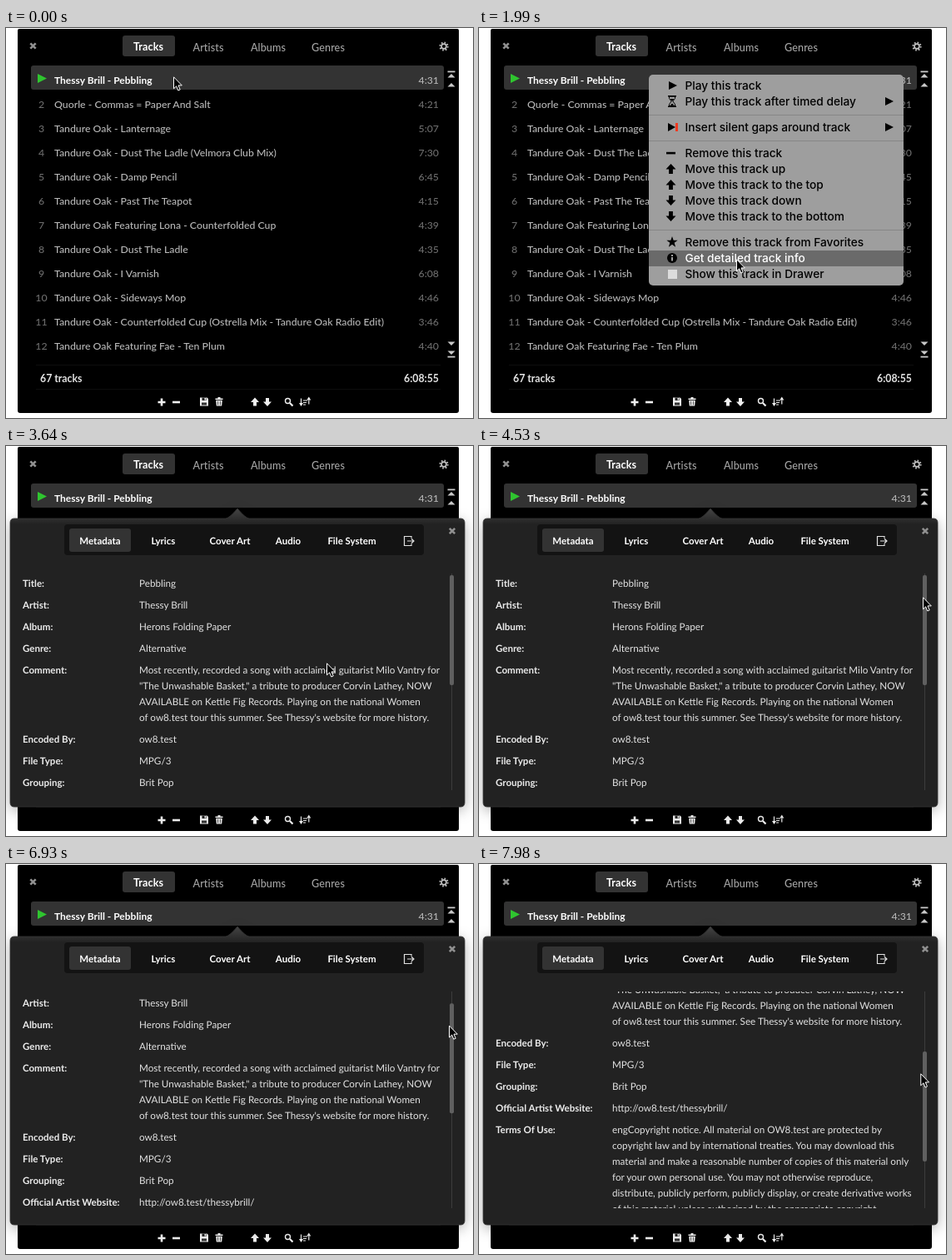
An HTML page for the animation above (8000 ms loop, 561 by 468 pixels).

```html
<!DOCTYPE html>
<html lang="en">
<head>
<meta charset="utf-8">
<title>Track list</title>
<style>
  html, body { margin: 0; width: 100%; height: 100%; overflow: hidden; background: #fff; }
  svg { display: block; width: 100%; height: 100%; user-select: none; }
  text { font: 500 12.3px Lato, "Open Sans", sans-serif; white-space: pre; }
  .b { font-weight: 700; }
  .row { fill: #b8b8b8; }
  .row.b { font-size: 12px; }
  .num { fill: #6c6c6c; }
  .tab { font-size: 12.6px; fill: #a4a4a4; letter-spacing: .1px; }
  .info { font-size: 11.7px; font-weight: 400; fill: #e2e2e2; }
  .label { font-size: 11.5px; font-weight: 700; fill: #ececec; }
  .item { font: 500 13.7px Inter, "Liberation Sans", sans-serif; fill: #000; }
  #panel text { text-rendering: geometricPrecision; }
  #shell { filter: drop-shadow(0 4px 8px rgba(0, 0, 0, .3)); }
</style>
</head>
<body>
<svg id="stage" viewBox="0 0 561 468"></svg>
<script>
const LOOP = 8000;

const tracks = [
  ["Thessy Brill - Pebbling", "4:31"],
  ["Quorle - Commas = Paper And Salt", "4:21"],
  ["Tandure Oak - Lanternage", "5:07"],
  ["Tandure Oak - Dust The Ladle (Velmora Club Mix)", "7:30"],
  ["Tandure Oak - Damp Pencil", "6:45"],
  ["Tandure Oak - Past The Teapot", "4:15"],
  ["Tandure Oak Featuring Lona - Counterfolded Cup", "4:39"],
  ["Tandure Oak - Dust The Ladle", "4:35"],
  ["Tandure Oak - I Varnish", "6:08"],
  ["Tandure Oak - Sideways Mop", "4:46"],
  ["Tandure Oak - Counterfolded Cup (Ostrella Mix - Tandure Oak Radio Edit)", "3:46"],
  ["Tandure Oak Featuring Fae - Ten Plum", "4:40"]
];

const details = [
  ["Title:", "Pebbling"],
  ["Artist:", "Thessy Brill"],
  ["Album:", "Herons Folding Paper"],
  ["Genre:", "Alternative"],
  ["Comment:",
    "Most recently, recorded a song with acclaimed guitarist Milo Vantry for",
    "\"The Unwashable Basket,\" a tribute to producer Corvin Lathey, NOW",
    "AVAILABLE on Kettle Fig Records. Playing on the national Women",
    "of ow8.test tour this summer. See Thessy's website for more history."],
  ["Encoded By:", "ow8.test"],
  ["File Type:", "MPG/3"],
  ["Grouping:", "Brit Pop"],
  ["Official Artist Website:", "http://ow8.test/thessybrill/"],
  ["Terms Of Use:",
    "engCopyright notice. All material on OW8.test are protected by",
    "copyright law and by international treaties. You may download this",
    "material and make a reasonable number of copies of this material only",
    "for your own personal use. You may not otherwise reproduce,",
    "distribute, publicly perform, publicly display, or create derivative works",
    "of this material unless authorized by the appropriate copyright"]
];

// Menu entries: centre line, label, icon
const menu = [
  [69, "Play this track", "play"],
  [88, "Play this track after timed delay", "glass"],
  [119, "Insert silent gaps around track", "gap"],
  [150, "Remove this track", "minus"],
  [169, "Move this track up", "up"],
  [188, "Move this track to the top", "up"],
  [207, "Move this track down", "down"],
  [226, "Move this track to the bottom", "down"],
  [257, "Remove this track from Favorites", "star"],
  [276, "Get detailed track info", "info"],
  [295, "Show this track in Drawer", "box"]
];

const path = (d, fill, extra = "") => `<path d="${d}" fill="${fill}" ${extra}/>`;
const line = (d, color, w = 1) => path(d, "none", `stroke="${color}" stroke-width="${w}"`);
const rect = (x, y, w, h, fill, r = 0, extra = "") =>
  `<rect x="${x}" y="${y}" width="${w}" height="${h}" rx="${r}" fill="${fill}" ${extra}/>`;
const text = (x, y, str, cls, anchor = "start", fill = "") =>
  `<text x="${x}" y="${y}" class="${cls}" text-anchor="${anchor}"${fill && ` style="fill:${fill}"`}>${str}</text>`;
const at = (x, y, body, scale = 1) => `<g transform="translate(${x} ${y}) scale(${scale})">${body}</g>`;

const ARROW = "M0-5L5 .5H2V5H-2V.5H-5Z";
const flip = body => `<g transform="scale(1 -1)">${body}</g>`;
const starPath = "M" + Array.from({ length: 10 }, (_, i) => {
  const r = i % 2 ? 2.8 : 7, a = i * Math.PI / 5;
  return `${(r * Math.sin(a)).toFixed(2)} ${(-r * Math.cos(a)).toFixed(2)}`;
}).join("L") + "Z";
const bigArrow = at(-1.5, 0, path(ARROW, "#000"), 1.2);

const icons = {
  play: path("M-4-5L6 0L-4 5Z", "#000"),
  glass: line("M-5-6.2H5M-5 6.2H5", "#000", 1.6) +
    path("M-3.5-6V-3.5L-.8 0L-3.5 3.5V6H3.5V3.5L.8 0L3.5-3.5V-6Z", "none", 'stroke="#000"') +
    path("M-2.5-3L0 0L2.5-3ZM-3 5.5L0 2.5L3 5.5Z", "#000"),
  gap: path("M-5-5L4 0L-5 5Z", "#000") + rect(4, -5, 3, 10, "#f03a20"),
  minus: rect(-7, -1.2, 11, 2.6, "#000"),
  up: bigArrow,
  down: flip(bigArrow),
  star: path(starPath, "#000"),
  info: '<circle r="6"/>' + rect(-1, -1, 2, 4.5, "#a0a0a0") + rect(-1, -4, 2, 2, "#a0a0a0"),
  box: rect(-5, -5, 11, 11, "#dcdcdc")
};

const cross = (x, y) => at(x, y, line("M-3.2-3.2L3.2 3.2M3.2-3.2L-3.2 3.2", "#909090", 2.6));

function windowArt() {
  const ends = path("M-4.5 0L0-4.5L4.5 0Z", "#c8c8c8");
  const jump = rect(-4.5, -9.5, 9, 1.8, "#c8c8c8") + at(0, -1.5, ends) + at(0, 9.5, ends);
  return path("M14 3Q14 1 16 1H542Q544 1 544 3V459Q544 462 541 462H17Q14 462 14 459Z", "#000") +
    cross(32.5, 21.5) +
    rect(140, 9, 63, 25, "#333", 3) +
    text(171, 26.5, "Tracks", "tab b", "middle", "#fff") +
    ["Artists", "Albums", "Genres"].map((s, i) => text(243 + 72 * i, 27.5, s, "tab", "middle")).join("") +
    at(526, 22, `<g fill="none" stroke="#c4c4c4"><circle r="4.6" stroke-width="2" stroke-dasharray="1.6 2.01"/>
      <circle r="2.9" stroke-width="1.6"/></g>`) +
    rect(30, 45, 496, 29, "#333", 3) +
    path("M38 55L49 60.5L38 66Z", "#2fc52f") +
    tracks.map(([name, time], i) => {
      const y = 66.5 + 29 * i, on = i === 0;
      return (on ? "" : text(42.5, y, i + 1, "num", "middle")) +
        text(58, y, name, on ? "row b" : "row", "start", on ? "#fff" : "") +
        text(520, y, time, "num", "end", on ? "#b4b4b4" : "");
    }).join("") +
    at(535, 61, jump) + at(535, 386, flip(jump)) +
    line("M36 404.5H522M36 433.5H522", "#0e0e0e") +
    text(41, 424.5, "67 tracks", "b", "start", "#e4e4e4") +
    text(520, 424.5, "6:08:55", "b", "end", "#e4e4e4") +
    toolbar();
}

function toolbar() {
  const c = "#f0f0f0";
  return at(187, 449, line("M-4.5 0H4.5M0-4.5V4.5", c, 2.6)) +
    at(204.5, 449, line("M-4.5 0H4.5", c, 2.6)) +
    at(238, 448.5, path("M-5-5H3.5L5-3.5V5H-5Z", c) + rect(-2.5, -5, 5, 3.5, "#222") +
      rect(.5, -4.5, 1.5, 2.5, c) + rect(-3, 1, 6, 3, "#333")) +
    at(256, 448.5, path("M-4.5-4H-1.5V-5.5H1.5V-4H4.5V-2.5H-4.5ZM-3.8-1.8H3.8L3.2 5H-3.2Z", c) +
      line("M-1.4-.8V4M1.4-.8V4", "#222", .8)) +
    at(299, 448.5, path(ARROW, c)) +
    at(314, 449, flip(path(ARROW, c))) +
    at(339, 448, `<circle r="3" cx="-.5" cy="-.5" fill="none" stroke="${c}" stroke-width="1.4"/>` +
      line("M2 2L5.5 5.5", c, 2.2)) +
    at(359, 448.5, line("M-4.5-4V3.5M-2-1.5H3M-2 1H2M-2 3.5H1M4.8-2V3", c, 1.2) +
      path("M-7 1.5H-2L-4.5 5.5ZM2.3-2H7.3L4.8-6Z", c));
}

function menuArt() {
  return rect(204, 56, 306, 253, "#9e9e9e", 5) +
    line("M204 104.5H510M204 135.5H510M204 242.5H510", "#868686") +
    rect(204, 0, 306, 19, "#6a6a6a", 0, 'id="hover"') +
    menu.map(([y, label, icon]) => at(232, y, icons[icon]) +
      text(247.5, y + 5, label, "item")).join("") +
    [88, 119].map(y => path(`M488 ${y - 5}L498 ${y}L488 ${y + 5}Z`, "#000")).join("");
}

function panelArt() {
  const tabs = [[113, "Metadata"], [189, "Lyrics"], [269, "Cover Art"], [339, "Audio"], [415.5, "File System"]];
  let y = 169;
  const list = details.map(([label, ...lines]) => {
    const out = text(20, y, label, "label") +
      lines.map((s, i) => text(160, y + 19 * i, s, "info")).join("");
    y += 26 + 19 * (lines.length - 1);
    return out;
  }).join("");
  return `<defs>
      <linearGradient id="skin" gradientUnits="userSpaceOnUse" x1="0" y1="75" x2="0" y2="94">
        <stop stop-color="#444"/><stop offset="1" stop-color="#222"/></linearGradient>
      <clipPath id="view"><rect x="15" y="153" width="515" height="260"/></clipPath>
    </defs>` +
    path("M10 87H264Q269 86 278 75Q287 86 292 87H546Q551 87 551 92V428Q551 433 546 433H10Q5 433 5 428V92Q5 87 10 87Z",
      "url(#skin)", 'id="shell" stroke="#343434" stroke-width=".8"') +
    rect(70, 94, 432, 37, "#131313", 4) +
    rect(76, 99, 74, 28, "#333", 3) +
    tabs.map(([x, s]) => text(x, 118, s, "label", "middle", "#fff")).join("") +
    line("M487 110.5V108.5H478.5V119.5H487V117.5M482 114H489.5M487 111.2L490 114L487 116.8", "#e0e0e0", 1.2) +
    cross(536, 102) +
    `<g clip-path="url(#view)"><g id="list">${list}</g></g>` +
    line("M535.5 153V413", "#3c3c3c") +
    rect(533, 155, 5, 132, "#606060", 2, 'id="thumb"');
}

const pointer = path("M.5 .8V14.8L3.7 11.8L5.8 17L8.2 16L6 10.9H10.3Z", "#000",
  'stroke="#fff" stroke-linejoin="round"');

const $ = id => document.getElementById(id);
$("stage").innerHTML = windowArt() + `<g id="menu">${menuArt()}</g><g id="panel">${panelArt()}</g>` +
  `<g id="cursor">${pointer}</g>`;
const labels = document.querySelectorAll("#menu .item");

// Held steps: time, then values
const moves = [
  [0, 201, 58], [1250, 212, 67], [1400, 232, 92], [1550, 258, 150], [1700, 283, 206],
  [1850, 302, 256], [1990, 309, 277], [3490, 324, 274], [3640, 385, 260], [3790, 468, 240],
  [3940, 514, 228], [4090, 520, 220], [4240, 527, 203], [4390, 532, 187], [4530, 533, 181]
];
// time, scale, opacity
const pops = [[0, 0, 0], [3190, .14, .12], [3340, .547, .5], [3490, .95, .92], [3640, 1, 1]];
const held = (steps, t) => steps.findLast(s => s[0] <= t);

function draw(t) {
  let [, x, y] = held(moves, t);
  let scroll = 0;
  if (t >= 6330) {
    const k = Math.floor((t - 6330) / 150);
    scroll = Math.round(4 + .84 * k + 1.02 * k * k);
    x -= k / 4;
    y += scroll * .511;
  }
  $("cursor").setAttribute("transform", `translate(${x} ${y})`);
  $("list").setAttribute("transform", `translate(0 ${-scroll})`);
  $("thumb").setAttribute("y", 155 + scroll * .511);

  $("menu").style.display = t >= 500 && t < 3040 ? "" : "none";
  const hot = t < 1250 ? -1 : menu.findIndex(m => Math.abs(m[0] - y) <= 9.5);
  $("hover").style.display = hot < 0 ? "none" : "";
  if (hot >= 0) $("hover").setAttribute("y", menu[hot][0] - 9);
  labels.forEach((el, i) => el.style.fill = i === hot ? "#fff" : "#000");

  const [, scale, alpha] = held(pops, t);
  const panel = $("panel");
  panel.style.display = alpha ? "" : "none";
  panel.style.opacity = alpha;
  panel.setAttribute("transform", `translate(278 75) scale(${scale}) translate(-278 -75)`);
}

const start = performance.now();
function tick() {
  draw((performance.now() - start) % LOOP);
  requestAnimationFrame(tick);
}
tick();
</script>
</body>
</html>
```
